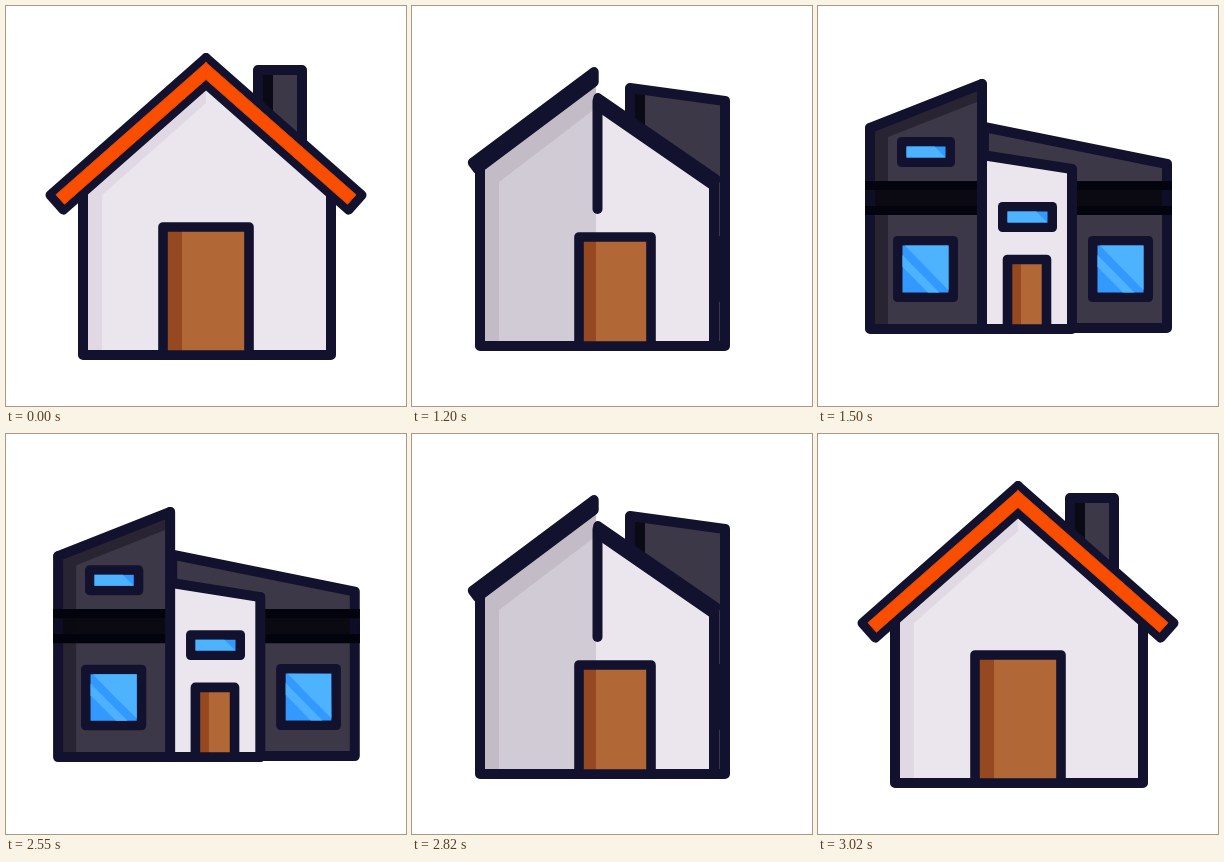
An HTML page with a canvas that plays this animation: 400 px wide and 400 px high, repeating every 3050 ms.

```html
<!DOCTYPE html>
<html lang="en">
<head>
<meta charset="utf-8">
<title>House morph</title>
<style>
html, body { margin: 0; width: 100%; height: 100%; overflow: hidden; background: #fff; }
canvas { display: block; width: 100vw; height: 100vh; }
</style>
</head>
<body>
<canvas id="stage" width="400" height="400"></canvas>
<script>
const ctx = document.getElementById('stage').getContext('2d');
const LOOP = 3050, STEP = 25, STEPS = 20;
const NAVY = '#12122f', ORANGE = '#f94d00', WHITE = '#ebe6ee', SLATE = '#3d3847';
const BLUE = '#3399ff', SKY = '#4db3ff';

const mix = (a, b, k) => a + (b - a) * k;
const clamp = v => Math.max(0, Math.min(1, v));

// Symmetric ease-in-out, solved by bisection
function ease(t) {
  let lo = 0, hi = 1;
  for (let i = 0; i < 30; i++) {
    const s = (lo + hi) / 2, r = 1 - s;
    const x = 1.26 * s * r * r + 1.74 * s * s * r + s * s * s;
    if (x < t) lo = s; else hi = s;
  }
  return lo * lo * (3 - 2 * lo);
}

// Four poses: cottage, opening, nearly built, modern house
const STOPS = [0, ease(0.4), ease(0.6), 1];
let e = 0, seg = 0, part = 0;

function setPose(u) {
  e = u <= 0 ? 0 : u >= 1 ? 1 : ease(u);
  seg = e < STOPS[1] ? 0 : e < STOPS[2] ? 1 : 2;
  part = (e - STOPS[seg]) / (STOPS[seg + 1] - STOPS[seg]);
}

const at = (...v) => mix(v[seg], v[seg + 1], part);

function tint(...hex) {
  const rgb = h => [1, 3, 5].map(i => parseInt(h.slice(i, i + 2), 16));
  const a = rgb(hex[seg]), b = rgb(hex[seg + 1]);
  return `rgb(${a.map((v, i) => Math.round(mix(v, b[i], part))).join(',')})`;
}

function path(points, closed = true) {
  ctx.beginPath();
  points.forEach(([x, y], i) => i ? ctx.lineTo(x, y) : ctx.moveTo(x, y));
  if (closed) ctx.closePath();
}

function poly(points, color) {
  path(points);
  ctx.fillStyle = color;
  ctx.fill();
}

function line(points, width = 10, closed = false) {
  path(points, closed);
  ctx.strokeStyle = NAVY;
  ctx.lineWidth = width;
  ctx.stroke();
}

function box(x0, y0, x1, y1, color) {
  ctx.fillStyle = color;
  ctx.fillRect(x0, y0, x1 - x0, y1 - y0);
}

function faded(alpha, draw) {
  if (alpha <= 0) return;
  ctx.save();
  ctx.globalAlpha = alpha;
  draw();
  ctx.restore();
}

function pane(x0, y0, x1, y1, glare, streak) {
  if (x1 - x0 < 6 || y1 - y0 < 6) return;
  ctx.beginPath();
  ctx.roundRect(x0, y0, x1 - x0, y1 - y0, 4.5);
  ctx.fillStyle = NAVY;
  ctx.fill();
  const x = x0 + 9.5, y = y0 + 9.5, w = x1 - x0 - 19, h = y1 - y0 - 19;
  if (w <= 0 || h <= 0) return;
  const place = ps => ps.map(([a, b]) => [x + a * w, y + b * h]);
  box(x, y, x + w, y + h, BLUE);
  poly(place(glare), SKY);
  if (streak) {
    faded(clamp((e - STOPS[2]) / (1 - STOPS[2])), () =>
      poly(place([[0, 0.2], [0, 0.45], [0.55, 1], [0.8, 1]]), SKY));
  }
}

const SMALL = [[0, 0], [0.72, 0], [1, 1], [0, 1]];
const LARGE = [[0.05, 0], [1, 0], [1, 0.95], [0.52, 0.47]];

function glareFrom(start) {
  const k = clamp((e - STOPS[2]) / (1 - STOPS[2]));
  return start.map(([x, y], i) => [mix(x, LARGE[i][0], k), mix(y, LARGE[i][1], k)]);
}

function band(x0, x1, outer, barAlpha) {
  const y0 = at(184, 184, 184, 175), y1 = at(220, 220, 219, 209);
  faded(at(0, 0, 0.28, 1), () => {
    box(x0, y0, x1, y1, '#0b0a12');
    if (e > STOPS[2]) box(outer - 5, y0 + 9, outer + 5, y1 - 9, '#0e0e26');
  });
  faded(barAlpha, () => {
    box(x0, y0, x1, y0 + 9, '#04040f');
    box(x0, y1 - 9, x1, y1, '#04040f');
  });
}

// Roof slope: square cut at the eave, vertical cut at the ridge
function slope(ridge, eave, half, inset) {
  const dx = eave[0] - ridge[0], dy = eave[1] - ridge[1], len = Math.hypot(dx, dy);
  const side = Math.sign(dx), ux = dx / len, uy = dy / len;
  const nx = uy * side * half, ny = -ux * side * half;
  const rise = half * len / Math.abs(dx);
  const [rx, ry] = [ridge[0] + ux * inset[0], ridge[1] + uy * inset[0]];
  const [ex, ey] = [eave[0] - ux * inset[1], eave[1] - uy * inset[1]];
  return [[rx, ry - rise], [ex + nx, ey + ny], [ex - nx, ey - ny], [rx, ry + rise]];
}

function rightWing() {
  const x0 = at(252, 218, 182, 166), y0 = at(64, 82, 102, 121);
  const x1 = at(296, 313, 333, 349), y1 = at(64, 95, 130, 158);
  const base = at(340, 340, 330, 322), strip = at(15, 15, 13, 1);
  const shape = [[x0, y0], [x1, y1], [x1, base], [x0, base]];
  poly(shape, SLATE);
  poly([[x0, y0], [x0 + strip, y0], [x0 + strip, y0 + 70], [x0, y0 + 70]], '#0a0a14');
  line(shape, 10, true);
  band(at(281, 281, 281, 254), at(318, 318, 336, 354), x1, at(0, 0, 0.14, 1));
  pane(at(303, 303, 281, 270), 230, at(310, 310, 327, 335), 296,
    glareFrom([[0, 0.5], [0.5, 0.75], [1, 1], [0, 1]]), true);
}

function frontWall(base) {
  const x0 = at(200, 184, 174, 164), y0 = at(65, 96, 127, 149);
  const x1 = at(325, 302, 276, 254), y1 = at(175, 176, 168, 163);
  poly([[x0 - 2, y0], [x0, y0], [x1, y1], [x1, base], [x0 - 2, base]], WHITE);
  line([[x1, y1], [x1, base], [x0, base]]);
  pane(at(175, 175, 182, 180), at(231, 231, 214, 196),
    at(235, 235, 240, 239), at(231, 231, 233, 226), SMALL);
}

function leftWing(base) {
  const x0 = at(77, 68, 58.5, 52), y0 = at(174, 157, 137, 122);
  const x1 = at(200, 184, 173, 164), y1 = at(65, 72, 75, 78);
  const sx = at(96, 87, 77, 70);
  poly([[x0, y0], [x1, y1], [x1, base], [x0, base]],
    tint('#e0d8e3', '#c3bcc7', '#2f2a33', '#292431'));
  poly([[sx, at(189, 176, 150, 131)], [x1, at(97, 102, 95, 94)], [x1, base], [sx, base]],
    tint(WHITE, '#d0cbd5', '#4a4250', SLATE));
  line([[x0, y0], [x0, base], [x1, base]]);
  band(at(73, 73, 64, 47), x1, x0, at(0, 0, 0, 1));
  pane(79, at(175, 175, 154, 131), at(156, 156, 156, 137), at(175, 175, 171, 161), SMALL);
  pane(at(80, 80, 78, 75), at(340, 340, 284, 230),
    at(164, 164, 158, 140), at(340, 340, 314, 296),
    glareFrom([[0.15, 0], [0.8, 0], [1, 1], [0.3, 1]]), true);
  if (e > 0) {
    const x = at(200, 185.5, 173.5, 164);
    line([[x, at(65, 95, 75, 78)], [x, at(78, 203, 331, 323)]]);
  }
}

function roof() {
  const left = [
    [at(200, 182, 173, 164), at(65, 71, 75, 78)],
    [at(50.75, 63, 58.5, 52), at(196.5, 160, 137, 122)]
  ];
  const right = [
    [at(200, 186, 177, 164), at(65, 96, 127.5, 149)],
    [at(349.25, 302, 276, 254), at(196.5, 176, 168, 163)]
  ];
  const halves = [at(9.9, 4.2, 0.3, 0.3), at(9.9, 3.5, 0.3, 0.3)];
  [left, right].forEach(([r, v], i) => {
    const shape = slope(r, v, halves[i], [0, 0]);
    poly(shape, NAVY);
    line(shape, 9.4, true);
  });
  const core = at(6.4, 0, 0, 0);
  if (core < 0.2) return;
  for (const [r, v] of [left, right]) {
    const shape = slope(r, v, core, [Math.min(4.5, e * 30), 4.6]);
    poly(shape, ORANGE);
    path(shape);
    ctx.strokeStyle = ORANGE;
    ctx.lineWidth = 0.8;
    ctx.stroke();
  }
}

function door(base) {
  const x0 = at(157, 167, 182, 189.5), x1 = at(243, 239, 232, 228.5);
  const y = at(221, 231, 245.5, 253.5);
  box(x0, y, x1, base, '#b26836');
  box(x0, y, at(176, 184, 196, 203), base, '#964920');
  line([[x0, base], [x0, y], [x1, y], [x1, base]], 9.6, true);
}

function draw(now) {
  const t = now % LOOP;
  // The morph advances in fixed ticks
  const ticks = start => clamp((Math.floor((t - start) / STEP) + 1) / STEPS);
  setPose(ticks(1020) - ticks(2545));

  ctx.fillStyle = '#fff';
  ctx.fillRect(0, 0, 400, 400);
  ctx.lineJoin = ctx.lineCap = 'round';
  const base = at(349, 340, 331, 323);
  rightWing();
  frontWall(base);
  leftWing(base);
  roof();
  door(base);
}

const began = performance.now();
function tick() {
  draw(performance.now() - began);
  requestAnimationFrame(tick);
}
tick();
</script>
</body>
</html>
```
